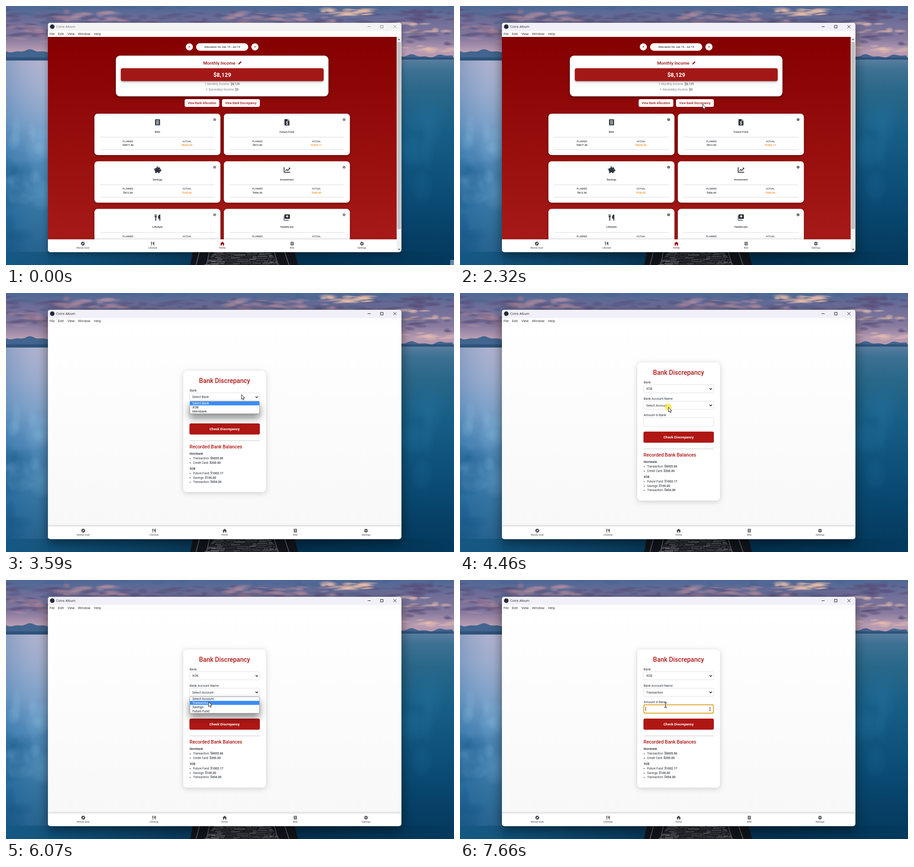
An HTML page with a canvas for the animation above (8 s loop, 983x570 px).

```html
<!DOCTYPE html>
<html lang="en">
<head>
<meta charset="utf-8">
<title>Budget planner</title>
<style>
html, body { margin: 0; width: 100%; height: 100%; overflow: hidden; background: #1d5c88; }
canvas { display: block; width: 983px; height: 570px; }
</style>
</head>
<body>
<canvas id="stage"></canvas>
<script>
const W = 983, H = 570, LOOP = 8000;
const DPR = window.devicePixelRatio || 1;
const APP = 'Coins Album', BANK_A = 'Mornbank', BANK_B = 'XOB';
const INK = '#2c323b', RED = '#b01815', ORANGE = '#ef8613';
const UI = '"Open Sans", "Noto Sans", sans-serif', BODY = 'Roboto, sans-serif';

function makeCanvas(el) {
  el.width = W * DPR;
  el.height = H * DPR;
  const c = el.getContext('2d');
  c.scale(DPR, DPR);
  return c;
}
const ctx = makeCanvas(document.getElementById('stage'));

// ---------- helpers ----------
function linear(c, x0, y0, x1, y1, stops) {
  const g = c.createLinearGradient(x0, y0, x1, y1);
  stops.forEach(([p, col]) => g.addColorStop(p, col));
  return g;
}
function rect(x, y, w, h, fill) {
  ctx.fillStyle = fill;
  ctx.fillRect(x, y, w, h);
}
function round(x, y, w, h, r, fill, stroke, lw = 1) {
  ctx.beginPath();
  ctx.roundRect(x, y, w, h, r);
  if (fill) { ctx.fillStyle = fill; ctx.fill(); }
  if (stroke) { ctx.strokeStyle = stroke; ctx.lineWidth = lw; ctx.stroke(); }
}
function shadowed(blur, dy, alpha, draw) {
  ctx.save();
  ctx.shadowColor = `rgba(0,0,0,${alpha})`;
  ctx.shadowBlur = blur * DPR;
  ctx.shadowOffsetY = dy * DPR;
  draw();
  ctx.restore();
}
function text(s, x, y, size, { color = INK, weight = 400, align = 'left', font = BODY } = {}) {
  ctx.font = `${weight} ${size}px ${font}`;
  ctx.textAlign = align;
  ctx.textBaseline = 'alphabetic';
  ctx.fillStyle = color;
  ctx.fillText(s, x, y + size * 0.355);
  return ctx.measureText(s).width;
}
const centered = (s, x, y, size, opt) => text(s, x, y, size, { ...opt, align: 'center' });
function disc(x, y, r, fill) {
  ctx.beginPath();
  ctx.arc(x, y, r, 0, Math.PI * 2);
  ctx.fillStyle = fill;
  ctx.fill();
}
function line(points, color, lw) {
  ctx.beginPath();
  points.forEach(([x, y], i) => i ? ctx.lineTo(x, y) : ctx.moveTo(x, y));
  ctx.strokeStyle = color;
  ctx.lineWidth = lw;
  ctx.stroke();
}

// ---------- icons: [solid shape, white cut-out] ----------
const icons = {
  bills: ['M-5.5-7l1.4 1 1.4-1L-1.3-6 0-7 1.3-6 2.7-7 4.1-6 5.5-7V7L4.1 6 2.7 7 1.3 6 0 7-1.3 6-2.7 7-4.1 6-5.5 7z',
    'M-3.3-4h6.6v1.4h-6.6zM-3.3-.7h6.6v1.4h-6.6zM-3.3 2.6h6.6V4h-6.6z'],
  fund: ['M-5.5-6q0-1 1-1H1.5V-3H5.5V6q0 1-1 1h-9q-1 0-1-1zM2.4-7L5.5-3.8H2.4z', ''],
  savings: ['M-6.5-1.5Q-5-4.8 0-4.8H3L5.5-6.2V-3.2Q6.3-2.2 6.8-1H8V3H6.2Q5.5 4 4.5 4.8V7H1.5V5.3H-2V7H-5V4Q-7 2-6.5-1.5zM-8-3q0 3 2 3v-1q-1-.5-1-2zM-2.8-5.4a2.6 2.2 0 0 1 5.2 0z',
    'M3.7-1.6h1.2v1.2H3.7z'],
  invest: ['M-7-6h1.8V4.2H7V6H-7zM-3.6 1.2L-.6-2 1.6 0 5-3.6 6.2-2.4 1.7 2.4-.6.3-2.5 2.4zM3.2-5H7v3.8z', ''],
  lifestyle: ['M-6.4-7h1v4h.8v-4h1v4h.8v-4h1v4.6q0 1.6-1.1 2V7h-2V-.4q-1.5-.4-1.5-2zM6-7V7H4V2.5H1.2V-2Q1.6-6 6-7z', ''],
  health: ['M-4-7h9q1.5 0 1.5 1.5v7q0 1.5-1.5 1.5h-9q-1.5 0-1.5-1.5v-7q0-1.5 1.5-1.5zM-7-4h.9v8.3q0 1 1 1H4v1.4H-5.5Q-7 6.7-7 5.2z',
    'M-.3-5.3h1.6v1.8h1.8v1.6H1.3v1.8H-.3v-1.8h-1.8v-1.6h1.8z'],
  home: ['M0-7L8 0H6V7H2V2H-2V7H-6V0H-8z', ''],
  goal: ['M-7 0a7 7 0 1 1 14 0a7 7 0 1 1-14 0z', 'M4-4L1.4 1.4-4 4-1.4-1.4z'],
  settings: ['M-1.8-7H1.8V7H-1.8zM-6.9-2L-5.2-5 6.9 2 5.2 5zM-5.2 5L-6.9 2 5.2-5 6.9-2zM-5 0a5 5 0 1 1 10 0a5 5 0 1 1-10 0z',
    'M-2.2 0a2.2 2.2 0 1 1 4.4 0a2.2 2.2 0 1 1-4.4 0z']
};
for (const k in icons) icons[k] = icons[k].map(d => new Path2D(d));

function icon(name, x, y, scale = 1, color = INK) {
  ctx.save();
  ctx.translate(x, y);
  ctx.scale(scale, scale);
  ctx.fillStyle = color;
  ctx.fill(icons[name][0]);
  ctx.fillStyle = '#fff';
  ctx.fill(icons[name][1]);
  if (name === 'fund') centered('$', 0, 1.6, 9, { color: '#fff', weight: 700 });
  ctx.restore();
}

// ---------- desktop ----------
function paintDesktop() {
  const el = document.createElement('canvas'), c = makeCanvas(el);
  let seed = 11;
  const rnd = () => (seed = (seed * 16807) % 2147483647) / 2147483647;
  const fill = (x, y, w, h, f) => { c.fillStyle = f; c.fillRect(x, y, w, h); };
  const puff = (x, y, rx, ry, rgb, a) => {
    c.save();
    c.translate(x, y);
    c.rotate((rnd() - 0.5) * 0.2);
    c.scale(rx, ry);
    const g = c.createRadialGradient(0, 0, 0, 0, 0, 1);
    g.addColorStop(0, `rgba(${rgb},${a})`);
    g.addColorStop(0.6, `rgba(${rgb},${a * 0.6})`);
    g.addColorStop(1, `rgba(${rgb},0)`);
    c.fillStyle = g;
    c.fillRect(-1, -1, 2, 2);
    c.restore();
  };
  // puffs scattered over the box x, y, w, h
  const cloud = (n, x, y, w, h, rgb, a) => {
    for (let i = 0; i < n; i++) puff(x + rnd() * w, y + rnd() * h, 8 + rnd() * 24, 2 + rnd() * 4.5, rgb, a);
  };
  const PLUM = '88,78,120', PINK = '190,146,162', PEACH = '240,196,172', SLATE = '70,96,140';
  fill(0, 0, W, 121, linear(c, 0, 0, 0, 120, [[0, '#4d6894'], [0.25, '#6d6d98'], [0.6, '#877a9f'], [0.82, '#b89cb2'], [1, '#b596ab']]));
  cloud(60, 0, 8, W, 30, PLUM, 0.6);
  cloud(30, 0, 0, W, 38, SLATE, 0.5);
  cloud(20, 90, 12, 170, 22, PINK, 0.5);
  cloud(26, 480, 10, 240, 24, PINK, 0.5);
  cloud(18, 690, 6, 120, 18, PEACH, 0.65);
  cloud(12, 0, 38, 92, 36, PLUM, 0.65);
  cloud(8, 0, 34, 92, 45, PINK, 0.5);
  cloud(14, 868, 10, 115, 28, PLUM, 0.65);
  cloud(9, 868, 36, 115, 22, PEACH, 0.6);
  cloud(10, 868, 58, 115, 26, PLUM, 0.6);
  cloud(9, 868, 88, 115, 14, PEACH, 0.5);

  // distant hills
  c.fillStyle = '#41658f';
  c.beginPath();
  c.moveTo(0, 121);
  for (let x = 0; x <= W; x += 5) {
    c.lineTo(x, (x < 480 ? 99 : 110) + 2.5 * Math.sin(x * 0.09) + 1.5 * Math.sin(x * 0.21));
  }
  c.lineTo(W, 121);
  c.fill();
  fill(0, 113, W, 8, 'rgba(40,76,114,.7)');

  fill(0, 120, 480, 450, linear(c, 0, 120, 0, 570,
    [[0, '#b3b4d0'], [0.14, '#a0afd0'], [0.3, '#7ca2ca'], [0.45, '#4b88b8'], [0.62, '#2f75a6'], [0.8, '#1f6594'], [1, '#0f4f7c']]));
  fill(0, 120, 92, 450, linear(c, 0, 0, 92, 0, [[0, 'rgba(40,105,160,.28)'], [1, 'rgba(190,190,215,.1)']]));
  fill(480, 118, 503, 452, linear(c, 0, 118, 0, 570,
    [[0, '#587e9f'], [0.05, '#3d7193'], [0.16, '#296788'], [0.35, '#175e86'], [0.6, '#0d5079'], [0.8, '#07436a'], [1, '#04385b']]));
  for (let i = 0; i < 14; i++) puff(rnd() * 90, 240 + rnd() * 200, 10 + rnd() * 25, 10 + rnd() * 30, '135,185,222', 0.28);
  for (let i = 0; i < 8; i++) puff(rnd() * 40, 330 + rnd() * 200, 12 + rnd() * 25, 15 + rnd() * 30, '15,80,130', 0.3);
  for (let i = 0; i < 8; i++) puff(880 + rnd() * 100, 200 + rnd() * 220, 15 + rnd() * 30, 20 + rnd() * 40, '35,115,160', 0.2);
  fill(0, 541, W, 29, linear(c, 0, 0, W, 0,
    [[0, 'rgba(18,88,130,.7)'], [0.4, 'rgba(7,56,88,.9)'], [0.65, 'rgba(2,48,78,.9)'], [1, 'rgba(3,58,94,.7)']]));

  // jetty: dark sides, weathered boards widening towards the viewer
  c.fillStyle = '#11151b';
  c.beginPath();
  [[410, 541], [633, 541], [641, 570], [404, 570]].forEach(p => c.lineTo(...p));
  c.fill();
  for (let y = 541; y < 570; y += 3) {
    const half = 62 + (y - 541) * 0.75;
    for (let x = -half; x < half;) {
      const w = 6 + rnd() * 20, v = 45 + rnd() * 75;
      fill(518 + x, y + rnd(), Math.min(w, half - x), 1.9, `rgb(${v},${v},${v + 5})`);
      x += w + rnd() * 3;
    }
  }
  c.lineCap = 'round';
  [[424, -7], [446, -6], [589, 8], [612, 9]].forEach(([x, lean]) => {
    c.strokeStyle = '#55575c';
    c.lineWidth = 2;
    c.beginPath();
    c.moveTo(x, 543);
    c.lineTo(x + lean, 570);
    c.stroke();
  });
  return el;
}
const desktop = paintDesktop();

// ---------- window frame ----------
const WIN = { x: 92, y: 37, w: 775.5, h: 504.5 };

function windowFrame(active) {
  const { x, y, w, h } = WIN;
  shadowed(active ? 26 : 14, active ? 8 : 4, active ? 0.5 : 0.35, () => round(x, y, w, h, 5, '#fff'));
  ctx.save();
  ctx.beginPath();
  ctx.roundRect(x, y, w, h, 5);
  ctx.clip();
  rect(x, y, w, 18, active ? '#f1f0f8' : '#f3f3f3');
  rect(x, y + 18, w, 13, '#fdfdfd');
  const col = active ? '#1b1b1f' : '#8a8a8a';
  disc(101.5, 45.5, 5, '#23283a');
  text(APP, 110, 45.7, 7.2, { font: UI, color: active ? '#222' : '#777' });
  line([[793.5, 45.5], [800, 45.5]], col, 1);
  ctx.strokeRect(821.8, 42.7, 5.6, 5.6);
  line([[850.2, 42.3], [856.6, 48.7]], col, 1);
  line([[856.6, 42.3], [850.2, 48.7]], col, 1);
  [['File', 95.5], ['Edit', 114], ['View', 135], ['Window', 158], ['Help', 193]]
    .forEach(([s, mx]) => text(s, mx, 61.6, 7.2, { font: UI, color: '#222' }));
}

function navBar(width, home) {
  shadowed(4, -1, 0.25, () => rect(WIN.x, 513.5, width, 30, '#fff'));
  [['Money Goal', 'goal'], ['Lifestyle', 'lifestyle'], ['Home', 'home'], ['Bills', 'bills'], ['Settings', 'settings']]
    .forEach(([label, name], i) => {
      const x = WIN.x + width * (i + 0.5) / 5;
      const on = home && name === 'home';
      icon(name, x, 523, 0.6, on ? '#8f0808' : '#444750');
      centered(label, x, 532.2, 5.3, { color: on ? '#7c1010' : '#444750' });
    });
}

// ---------- home page ----------
const funds = [
  ['Bills', 'bills', '$4877.40', '$5320.66'], ['Future Fund', 'fund', '$812.90', '$1002.17'],
  ['Savings', 'savings', '$812.90', '$100.00'], ['Investment', 'invest', '$406.45', '$350.00'],
  ['Lifestyle', 'lifestyle', '', ''], ['Healthcare', 'health', '', '']
];

function fundCard([label, name, planned, actual], i, infoColor) {
  const x = 194 + (i % 2) * 284, y = 237 + Math.floor(i / 2) * 104.8;
  shadowed(7, 2, 0.3, () => round(x, y, 276.5, 91, 7, '#fff'));
  icon(name, x + 138.5, y + 19);
  centered(label, x + 138.3, y + 39.7, 6, { weight: 500 });
  disc(x + 263.8, y + 13, 3, infoColor);
  rect(x + 263.3, y + 12.5, 1, 2, '#fff');
  rect(x + 263.3, y + 11, 1, 0.9, '#fff');
  rect(x + 11.5, y + 51.2, 253.5, 0.8, '#d2d2d4');
  rect(x + 11.5, y + 78.7, 253.5, 0.8, '#d2d2d4');
  centered('PLANNED', x + 73.7, y + 60.7, 5.2, { color: '#4a4f58', weight: 500 });
  centered('ACTUAL', x + 203, y + 60.7, 5.2, { color: '#4a4f58', weight: 500 });
  centered(planned, x + 73.7, y + 69.3, 5.7, { weight: 500 });
  centered(actual, x + 203, y + 69.3, 5.7, { color: ORANGE, weight: 500 });
}

function incomeLine(label, value, y) {
  ctx.font = `400 6.7px ${BODY}`;
  const x = 474.5 - ctx.measureText(label + value).width / 2;
  const w = text(label, x, y, 6.7, { color: '#7b7b86' });
  text(value, x + w, y, 6.7);
}

function homePage(t) {
  rect(92, 68, 765.5, 446, linear(ctx, 0, 68, 0, 513, [[0, '#850000'], [1, '#a61a18']]));
  disc(402.3, 90, 7.8, '#fff');
  disc(546.2, 90, 7.8, '#fff');
  centered('<', 402.3, 90, 7, { weight: 700, color: '#8b0000' });
  centered('>', 546.2, 90, 7, { weight: 700, color: '#8b0000' });
  round(417, 82, 114.5, 16.5, 8.2, '#fff');
  centered('Allocation for Jun 15 - Jul 14', 474.3, 90.3, 6.1, { weight: 500 });

  shadowed(10, 3, 0.35, () => round(241, 109.3, 466.5, 89.5, 9, '#fff'));
  centered('Monthly Income', 468, 125.2, 9.8, { weight: 500, color: '#9a0d0d' });
  line([[510.2, 128.2], [514.7, 123.7]], '#9a0d0d', 2.4);
  disc(515, 123.4, 1.3, '#9a0d0d');
  shadowed(4, 2, 0.35, () => round(252, 137, 445, 28.2, 4, '#a31816'));
  centered('$8,129', 474.5, 151.2, 12.6, { weight: 700, color: '#fff' });
  incomeLine('+ Monthly Income: ', '$8,129', 171.8);
  incomeLine('+ Secondary Income: ', '$0', 183.7);

  round(392, 205, 76, 17, 3.5, '#fff');
  round(474, 205, 83, 17, 3.5, '#fff');
  centered('View Bank Allocation', 430, 213.6, 6.6, { weight: 500, color: '#9a1512' });
  centered('View Bank Discrepancy', 515.4, 213.6, 6.6, { weight: 500, color: '#9a1512' });

  const info = t < 2120 ? '#77777a' : '#56565a';
  funds.forEach((f, i) => fundCard(f, i, info));
  navBar(765.5, true);

  rect(857.5, 68, 10, 474, '#f1f1f1');
  rect(858.5, 79, 8, 412, '#c1c1c1');
  ctx.fillStyle = '#555';
  ctx.fill(new Path2D('M860 75h5l-2.5-3zM860 534.5h5l-2.5 3z'));
}

// ---------- discrepancy page ----------
const balances = [
  [BANK_A, 183], ['Transaction: ', 193, '$6005.66'], ['Credit Card: ', 202.6, '$200.00'],
  [BANK_B, 215.6], ['Future Fund: ', 225.7, '$1002.17'], ['Savings: ', 235.4, '$100.00'], ['Transaction: ', 245, '$454.00']
];

function field(y, value) {
  round(403, y, 153.5, 18, 3, '#fff', '#dcdce0', 0.9);
  text(value, 408.5, y + 9.2, 7);
  line([[547.6, y + 7.9], [550.2, y + 10.5], [552.8, y + 7.9]], '#222', 1.5);
}

function amountField(y, focused, caret) {
  if (!focused) return round(403, y, 153.5, 19, 3, '#fff', '#dcdce0', 0.9);
  round(403.3, y + 0.3, 152.7, 18.6, 3, '#fff', '#d79a10', 1.7);
  ctx.fillStyle = '#444';
  ctx.fill(new Path2D(`M546.3 ${y + 8.3}h4.4l-2.2-2.6zM546.3 ${y + 11}h4.4l-2.2 2.6z`));
  if (caret) rect(407, y + 5, 1, 9, '#222');
}

function dropdown(y, rows, cursorY) {
  const h = rows.length * 9;
  const hot = Math.max(0, Math.min(rows.length - 1, Math.floor((cursorY - y) / 9)));
  shadowed(16, 9, 0.45, () => round(403.2, y, 153, h + 0.5, 2, '#fff', '#8b8b90', 0.8));
  rect(403.6, y + hot * 9 + 0.2, 152.2, 8.8, '#3a8df4');
  rows.forEach((s, i) => text(s, 409, y + i * 9 + 4.6, 7, { color: i === hot ? '#fff' : '#1d2230' }));
}

function discrepancyPage(t, cursorY) {
  const loaded = t >= 2470, picked = t >= 4400;
  const top = !loaded ? 203.2 : picked ? 153 : 171;
  const shift = picked ? 36 : 0;
  rect(92, 68, 775.5, 446, linear(ctx, 0, 68, 0, 513, [[0, '#ffffff'], [1, '#f8f8f9']]));
  shadowed(12, 2, 0.18, () => round(389, top, 181.5, !loaded ? 202.8 : picked ? 304 : 267, 8, '#fff'));

  const label = (s, y) => text(s, 403, top + y, 7);
  centered('Bank Discrepancy', 479.6, top + 21.7, 14, { weight: 500, color: RED });
  label('Bank', 43.5);
  field(top + 48.8, picked ? BANK_B : 'Select Bank');
  if (picked) {
    label('Bank Account Name', 79.6);
    field(top + 85, t >= 6200 ? 'Transaction' : 'Select Account');
  }
  label('Amount in Bank', 79.3 + shift);
  amountField(top + 85.3 + shift, t >= 6600, t < 7130 || t >= 7660);
  round(402.5, top + 116 + shift, 154.5, 24.5, 3.5, '#af1714');
  centered('Check Discrepancy', 479.6, top + 127.9 + shift, 7.7, { weight: 700, color: '#fff' });
  rect(403, top + 153.6 + shift, 154, 0.9, '#bdbdc0');
  text('Recorded Bank Balances', 402.7, top + 167.8 + shift, 10.4, { weight: 500, color: RED });

  if (!loaded) text('Loading...', 403, top + 183.6, 6.9, { color: '#7a211c' });
  else balances.forEach(([s, y, amount]) => {
    y += top + shift;
    if (!amount) return text(s, 403, y, 6.5, { weight: 500 });
    disc(404.2, y + 0.4, 1, INK);
    const w = text(s, 410.5, y, 6.6);
    text(amount, 410.5 + w, y, 6.6, { weight: 500 });
  });
  navBar(775.5, false);

  if (t >= 3450 && t < 4400) dropdown(238.3, ['Select Bank', BANK_B, BANK_A], cursorY);
  if (t >= 5260 && t < 6200) dropdown(256.8, ['Select Account', 'Transaction', 'Savings', 'Future Fund'], cursorY);
}

// ---------- pointer ----------
// start, end, steps, destination
const moves = [
  [70, 190, 3, 900, 507], [400, 1190, 13, 545, 222], [1260, 2060, 13, 532, 216],
  [3190, 3250, 2, 516, 223], [3850, 4330, 8, 457, 251], [4660, 4790, 3, 457, 257],
  [4930, 5060, 3, 462, 247], [5330, 6000, 9, 444, 268], [6270, 6540, 5, 451, 275]
];
const clicks = [[2120, 2260], [3450, 3590], [4400, 4600], [5260, 5400], [6130, 6270], [6540, 6670]];
const arrow = new Path2D('M0 0V10.4L2.4 8.2 4 11.8 5.7 11 4.1 7.5H7.4z');

function pointerAt(t) {
  let x = 978, y = 562;
  for (const [t0, t1, n, tx, ty] of moves) {
    if (t < t0) break;
    const k = t >= t1 ? 1 : (Math.floor((t - t0) / (t1 - t0) * (n - 1)) + 1) / n;
    const e = k * k * (3 - 2 * k);
    x += (tx - x) * e;
    y += (ty - y) * e;
  }
  return { x, y };
}

function drawPointer(t, { x, y }) {
  if (clicks.some(([a, b]) => t >= a && t < b)) disc(x, y, 7.5, 'rgba(250,230,60,.8)');
  if (t >= 6270) {
    const bars = [[[x, y - 5], [x, y + 5]], [[x - 3.2, y - 5], [x + 3.2, y - 5]], [[x - 3.2, y + 5], [x + 3.2, y + 5]]];
    bars.forEach(p => line(p, '#fff', 2.6));
    bars.forEach(p => line(p, '#3a3f46', 1.4));
    return;
  }
  ctx.save();
  ctx.translate(x + 0.5, y + 0.5);
  ctx.fillStyle = '#fff';
  ctx.fill(arrow);
  ctx.strokeStyle = '#111';
  ctx.lineWidth = 0.9;
  ctx.stroke(arrow);
  ctx.restore();
}

// ---------- loop ----------
function draw(t) {
  const p = pointerAt(t);
  ctx.drawImage(desktop, 0, 0, W, H);
  windowFrame(t >= 2120);
  if (t < 2390) homePage(t);
  else discrepancyPage(t, p.y);
  ctx.restore();
  if (t < 70) {
    rect(975, 559, 8, 11, '#7d95b3');
    [562, 565, 568].forEach(y => rect(977, y, 5, 1, '#3f5f86'));
  } else drawPointer(t, p);
}

const start = performance.now();
function tick() {
  draw((performance.now() - start) % LOOP);
  requestAnimationFrame(tick);
}
tick();
</script>
</body>
</html>
```
